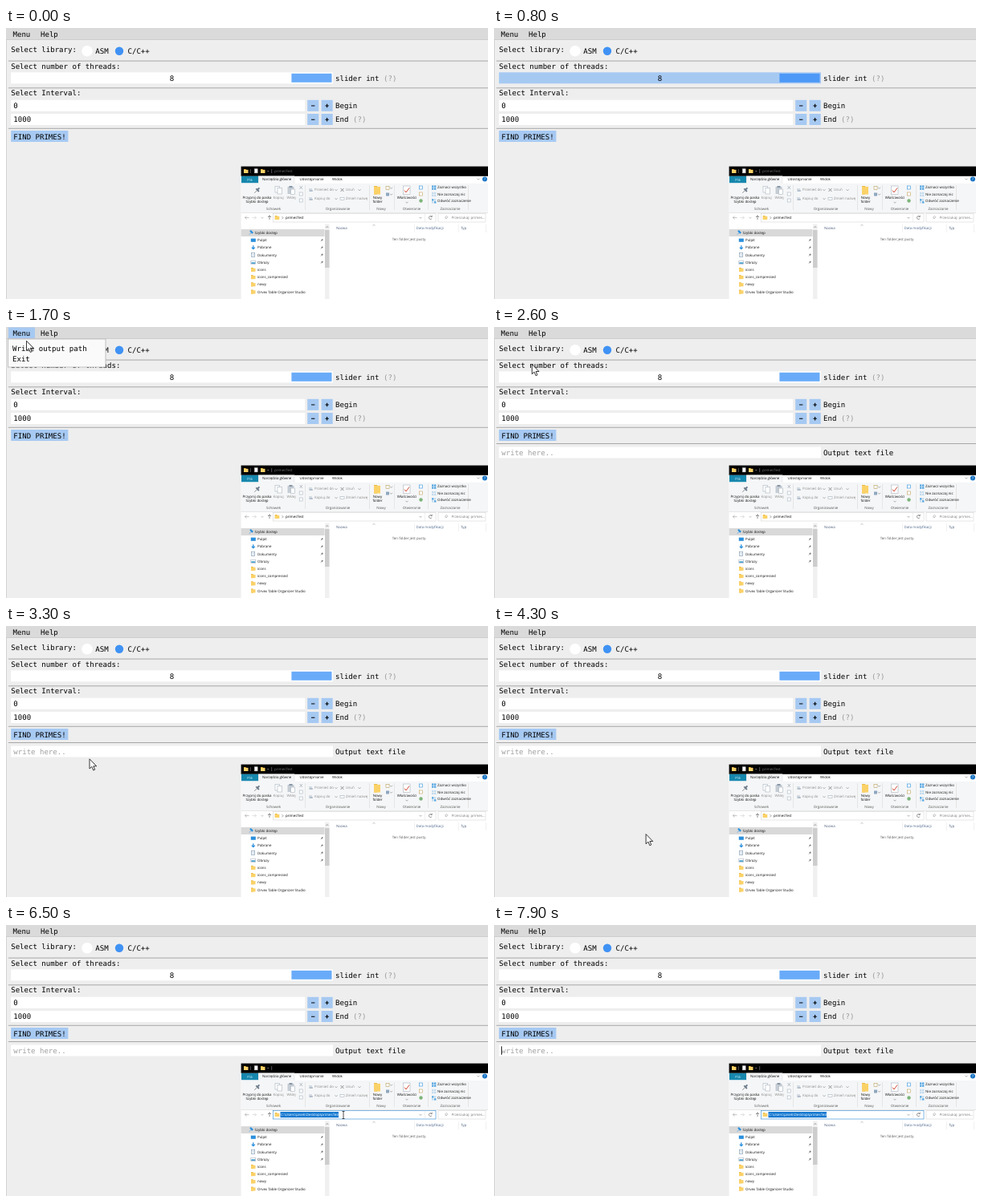
These frames come from a looping animation (600 px wide and 338 px high, 8000 ms). An HTML page:

```html
<!DOCTYPE html>
<html lang="en">
<head>
<meta charset="utf-8">
<title>Prime finder</title>
<style>
  html, body { margin: 0; width: 100%; height: 100%; overflow: hidden; background: #eee; }
  svg { display: block; width: 100vw; height: 100vh; }
  text { white-space: pre; text-rendering: geometricPrecision; }
  .mono { font: 9.05px "DejaVu Sans Mono", monospace; }
  .ui { font: 4.42px "Open Sans", "Noto Sans", sans-serif; }
</style>
</head>
<body>
<svg id="stage" viewBox="0 0 600 338"></svg>
<script>
const LOOP = 8000, STEP = 100;
const BLUE = '#a6c9f2', INK = '#000', DIM = '#999', FOLDER = '#fbd268', SKY = '#2a8fdc';
let layer = document.getElementById('stage');

function add(tag, attrs, content) {
  const el = document.createElementNS('http://www.w3.org/2000/svg', tag);
  for (const key in attrs) el.setAttribute(key, attrs[key]);
  if (content !== undefined) el.textContent = content;
  return layer.appendChild(el);
}
function group(draw) {
  const parent = layer;
  const g = layer = add('g', {});
  draw();
  layer = parent;
  return g;
}
const rect = (x, y, width, height, fill, more) => add('rect', { x, y, width, height, fill, ...more });
const circle = (cx, cy, r, fill) => add('circle', { cx, cy, r, fill });
const line = (d, stroke = '#666', width = 0.6) =>
  add('path', { d, stroke, 'stroke-width': width, fill: 'none' });
const mono = (x, y, s, fill = INK, anchor = 'start') =>
  add('text', { x, y, fill, class: 'mono', 'text-anchor': anchor }, s);
const ui = (x, y, s, fill = '#111', anchor = 'start') =>
  add('text', { x, y, fill, class: 'ui', 'text-anchor': anchor }, s);
const show = (el, on) => el.setAttribute('visibility', on ? 'visible' : 'hidden');

const separator = y => rect(3, y, 597, 1, '#a8a8a8');
const folder = (x, y, w = 5.5, h = 5) => {
  rect(x, y, w * 0.5, h, '#e8b43c');
  rect(x, y + 0.8, w, h - 0.8, FOLDER);
};
const sheet = (x, y, w, h, edge = '#a9b4c0') =>
  rect(x, y, w, h, '#fff', { stroke: edge, 'stroke-width': 0.6 });
const chevron = (x, y, color = '#777') => line(`M${x - 1.5} ${y - 0.7}l1.5 1.5l1.5 -1.5`, color);

/* Tool window */
rect(0, 0, 600, 338, '#eee');
rect(0, 0, 600, 14, '#dadada');
rect(0, 14, 600, 0.8, '#c6c6c6');
rect(0, 15, 0.8, 323, '#ccc');
const menuHead = rect(3, 0.5, 33, 13.5, BLUE);
mono(8.5, 11.3, 'Menu');
mono(43, 11.3, 'Help');

mono(6.2, 29.7, 'Select library:');
circle(101, 28.7, 6.8, '#fff');
mono(111.3, 32, 'ASM');
circle(141, 28.7, 5.2, '#3f92f4');
mono(151.5, 32, 'C/C++');
separator(40.6);

mono(6.2, 50.5, 'Select number of threads:');
const track = rect(6.2, 55.3, 400.8, 14, '#fff');
const grab = rect(355.4, 56.8, 50.1, 11, '#69abf9');
mono(206.5, 65.7, '8', INK, 'middle');
mono(410, 65.7, 'slider int');
mono(470, 65.7, '(?)', DIM);
separator(74.3);

mono(6.2, 84.2, 'Select Interval:');
[['0', 'Begin', 89.8], ['1000', 'End', 107]].forEach(([value, label, y]) => {
  rect(6.2, y, 366, 14, '#fff');
  rect(375.2, y, 14.1, 14, BLUE);
  rect(392.6, y, 14.1, 14, BLUE);
  line(`M380 ${y + 7.2}h4.4M397.4 ${y + 7.2}h4.4m-2.2 -2.2v4.4`, INK, 1.1);
  mono(9.3, y + 10.3, value);
  mono(410, y + 10.3, label);
});
mono(432, 117.3, '(?)', DIM);
separator(124.8);
rect(6.2, 128, 71.2, 14, BLUE);
mono(9.3, 138.7, 'FIND PRIMES!');

const outputRow = group(() => {
  separator(145);
  rect(6.2, 149.5, 400.8, 14, '#fff');
  mono(9.3, 159.6, 'write here..', '#a0a0a0');
  mono(410, 159.6, 'Output text file');
});
const caret = rect(9, 151.3, 0.9, 10.5, '#111');

/* File window: title and tabs */
rect(292.6, 172.6, 307.4, 165.4, '#fff');
rect(292.6, 172.6, 307.4, 12.2, '#000');
folder(296, 176);
rect(304, 176, 0.6, 5, '#777');
sheet(309.5, 175.8, 3.6, 5, '#ddd');
folder(317, 176);
line('M325.3 178.5h2', '#bbb');
rect(330.5, 176, 0.6, 5, '#888');
const title = ui(334, 180, 'primesTest', '#777');

rect(293, 184.8, 21, 8.5, '#1687ad');
ui(303.5, 190.5, 'Plik', '#bfe2ee', 'middle');
rect(314.5, 184.8, 44.5, 9.7, '#f5f6f7', { stroke: '#dcdcdc', 'stroke-width': 0.5 });
ui(319, 190.3, 'Narzędzia główne');
ui(365.5, 190.3, 'Udostępnianie');
ui(406, 190.3, 'Widok');
chevron(588, 188.5);
circle(596, 188.5, 3, '#1874c5');
ui(596, 190, '?', '#fff', 'middle');

/* Ribbon */
rect(292.6, 193.8, 307.4, 36.2, '#f5f6f7');
rect(292.6, 230, 307.4, 0.6, '#d8d8d8');
[372, 452, 483, 525, 575].forEach(x => rect(x, 196, 0.6, 31, '#dadada'));
[['Schowek', 333], ['Organizowanie', 413], ['Nowy', 467], ['Otwieranie', 505], ['Zaznaczanie', 553]]
  .forEach(([s, x]) => ui(x, 226.7, s, '#555', 'middle'));

line('M309.3 205.8l3 -3', '#777', 0.8);
line('M311.3 200.4l3.6 3.6M312.8 202.2l2.6 -2.9', '#6b7b8b', 1.9);
ui(312.5, 213.4, 'Przypnij do paska', '#111', 'middle');
ui(312.5, 218.4, 'Szybki dostęp', '#111', 'middle');
sheet(335, 197.5, 5.5, 7.5);
sheet(338, 199.5, 5.5, 7.5);
ui(339, 213.4, 'Kopiuj', '#8a8a8a', 'middle');
rect(350.5, 198, 8, 9, '#c5ccd4');
rect(352.5, 197, 4, 2, '#8795a5');
sheet(354.5, 201, 5, 6.5);
ui(355, 213.4, 'Wklej', '#8a8a8a', 'middle');
line('M365.5 197l3.5 4M369 197l-3.5 4', '#8d99a6');
sheet(365.2, 205, 4, 4);
sheet(365.2, 213, 4, 4);

[[202, 'Przenieś do', 'Usuń'], [213, 'Kopiuj do', 'Zmień nazwę']].forEach(([y, a, b], i) => {
  rect(377, y - 2, 4, 4, '#d5dbe2');
  line(`M378 ${y + 1}h4`, '#8fa3b8', 1);
  ui(384, y + 1.4, a, '#8a8a8a');
  chevron(411, y);
  ui(423, y + 1.4, b, '#8a8a8a');
  if (i) sheet(416, y - 1.5, 5, 3);
  else {
    line('M416.5 200l4 4M420.5 200l-4 4', '#888', 0.9);
    chevron(440, y);
  }
});

folder(458, 197, 8, 10.5);
ui(462.5, 213.4, 'Nowy', '#111', 'middle');
ui(462.5, 218.4, 'folder', '#111', 'middle');
sheet(473, 197.5, 4, 4, '#b59d5a');
chevron(479.5, 199.5);
rect(473, 205.5, 4, 4, '#8ea7bf');
chevron(479.5, 207.5);

sheet(494.5, 197, 8.5, 10.5);
line('M496 202.5l2 2.5l4 -5.5', '#d34b38', 1);
ui(499, 213.4, 'Właściwości', '#111', 'middle');
chevron(499, 217.5);
sheet(514.5, 197, 4, 4, SKY);
sheet(514.5, 205, 4, 4, '#c0a260');
circle(516.5, 215.5, 2.2, '#7db47a');

['Zaznacz wszystko', 'Nie zaznaczaj nic', 'Odwróć zaznaczenie'].forEach((s, row) => {
  const y = 199 + row * 8.4;
  for (let k = 0; k < 4; k++) {
    const on = row === 0 || (row === 2 && k % 3 === 0);
    rect(530 + (k % 2) * 3, y - 2.6 + (k >> 1) * 3, 2.4, 2.4, on ? '#5aaae4' : '#c3dcee');
  }
  ui(537, y + 1.4, s);
});

/* Address row */
line('M302.5 236.6h-5m2 -2l-2 2l2 2', '#999');
line('M306.5 236.6h5m-2 -2l2 2l-2 2', '#ccc');
chevron(319, 236.6, '#999');
line('M328 239v-5m-2 2l2 -2l2 2', '#444');
const addressBox = rect(332.5, 231.5, 202.5, 10.5, '#fff', { stroke: '#d5d5d5', 'stroke-width': 0.6 });
rect(521, 231.8, 0.5, 10, '#ddd');
folder(334.8, 234);
chevron(516, 236.6);
line('M530 235.3a2 2 0 1 0 .2 2.2M530.3 233.7v1.8h-1.8', '#555');
rect(538, 231.5, 59, 10.5, '#fff', { stroke: '#d5d5d5', 'stroke-width': 0.6 });
line('M546.5 238.2l1.6 -1.6m.2 -2a1.4 1.4 0 1 0 .1 0', '#888', 0.5);
ui(554.5, 238.1, 'Przeszukaj: primes...', '#777');
const crumb = group(() => {
  line('M343.5 235.1l1.5 1.6l-1.5 1.6');
  ui(348, 238.1, 'primesTest', '#000');
});
const fullPath = group(() => {
  rect(341.5, 233, 72.5, 7.2, '#1478d0');
  ui(342.2, 238.1, 'C:\\Users\\janek\\Desktop\\primesTest', '#fff');
});

/* Navigation pane */
rect(292.6, 251, 103.9, 9, '#d9d9d9');
line('M303 257.5l2.2 -2.2', SKY, 0.7);
line('M304 252.7l3.2 3.2', SKY, 2.2);
ui(309.5, 257.1, 'Szybki dostęp');
['Pulpit', 'Pobrane', 'Dokumenty', 'Obrazy', 'icons', 'icons_compressed', 'nowy',
  'Orvex Table Organizer Studio'].forEach((s, i) => {
  const y = 264.6 + i * 9.2;
  ui(313, y + 1.5, s);
  if (i > 3) return folder(305, y - 2.5);
  line(`M391.8 ${y + 1.6}l1.3 -1.3`, '#777', 0.6);
  line(`M392.8 ${y + 0.4}l1.5 -1.5`, '#777', 1.6);
  if (i === 0) rect(304.8, y - 2, 6, 4.2, SKY);
  if (i === 1) line(`M307.8 ${y - 2.5}v4m-2 -1.7l2 2l2 -2`, SKY, 1.3);
  if (i === 2) {
    sheet(305.5, y - 2.5, 4.2, 5, '#7891a8');
    line(`M306.5 ${y - 0.6}h2.3m-2.3 1.5h2.3`, '#6d9ec8', 0.4);
  }
  if (i === 3) {
    sheet(304.8, y - 2, 6, 4.2);
    rect(305.3, y, 5, 1.8, '#4ba2cf');
  }
});
rect(397, 244.5, 5.5, 94, '#f0f0f0');
rect(397, 252, 5.5, 47, '#cdcdcd');
line('M398.3 249l1.5 -1.5l1.5 1.5', '#666');

/* File list */
ui(411, 251, 'Nazwa', '#4c607a');
line('M456.5 246.6l1.5 -1.4l1.5 1.4', '#888', 0.5);
ui(510.5, 251, 'Data modyfikacji', '#4a6489');
ui(566, 251, 'Typ', '#4c607a');
[508, 563, 597].forEach(x => rect(x, 245, 0.5, 10, '#e2e2e2'));
ui(502, 264.6, 'Ten folder jest pusty.', '#555', 'middle');

/* Menu popup */
let itemGlow;
const popup = group(() => {
  rect(2.5, 15, 121.5, 35, '#fafafa', { stroke: '#b4b4b4', 'stroke-width': 0.8 });
  itemGlow = rect(5, 20.5, 116, 12.5, BLUE);
  mono(8, 30.2, 'Write output path');
  mono(8, 43.2, 'Exit');
});

/* Pointers */
const arrow = add('path', {
  d: 'M0 0V12.2L2.8 9.6L4.8 14.2L6.7 13.3L4.8 9H8.7Z',
  fill: '#fff', stroke: '#222', 'stroke-width': 0.9, 'stroke-linejoin': 'round'
});
const beam = line('M-1.5 -4.5h3M0 -4.5v9M-1.5 4.5h3', '#222', 0.8);

// time, x, y of the pointer
const path = [
  [900, 34, 27], [1000, 20, 8], [1300, 20, 8], [1700, 25.5, 17.3], [2100, 33, 26],
  [2200, 33, 26], [2600, 47.3, 46.5], [3000, 76, 118], [3300, 104, 165.8],
  [3900, 158, 240], [4800, 228, 284], [5300, 232.3, 275.5], [5800, 232.3, 275.5],
  [6300, 420, 237], [6650, 420, 237], [7000, 90, 157]
];
function pointerAt(t) {
  const i = path.findIndex(k => k[0] > t);
  if (i < 1) return null;
  const [a, b] = [path[i - 1], path[i]];
  const p = (t - a[0]) / (b[0] - a[0]);
  return [a[1] + (b[1] - a[1]) * p, a[2] + (b[2] - a[2]) * p];
}

function render(t) {
  const within = (from, to) => t >= from && t < to;
  const dragging = within(300, 900);
  track.setAttribute('fill', dragging ? BLUE : '#fff');
  grab.setAttribute('fill', dragging ? '#4d99f7' : '#69abf9');
  show(menuHead, within(1000, 2200));
  show(popup, within(1100, 2200));
  show(itemGlow, within(1900, 2200));
  show(outputRow, t >= 2200);
  show(caret, t >= 7200);

  const editing = t >= 6400;
  show(title, !editing);
  show(crumb, !editing);
  show(fullPath, editing);
  addressBox.setAttribute('stroke', editing ? '#2c86d3' : '#d5d5d5');

  const at = pointerAt(t);
  const overAddress = at && at[0] > 341 && at[0] < 515 && at[1] > 232 && at[1] < 242;
  show(arrow, at && !overAddress);
  show(beam, overAddress);
  if (at) [arrow, beam].forEach(el => el.setAttribute('transform', `translate(${at})`));
}

const start = performance.now();
function tick() {
  const t = (performance.now() - start) % LOOP;
  render(Math.floor(t / STEP) * STEP);
  requestAnimationFrame(tick);
}
tick();
</script>
</body>
</html>
```
